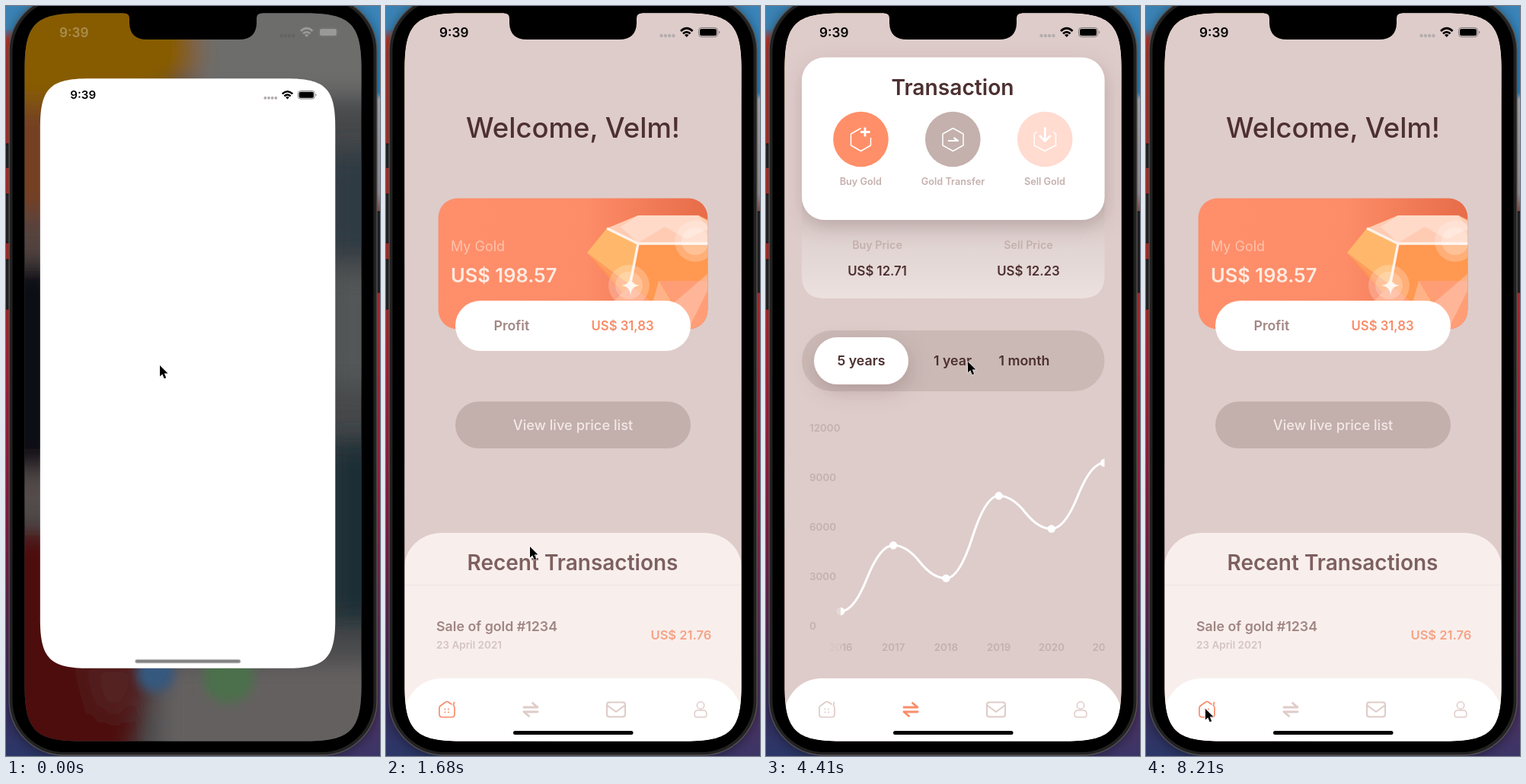
An HTML page that plays this animation: 491 by 985 pixels, repeating every 8.28 s.

```html
<!DOCTYPE html>
<html lang="en">
<head>
<meta charset="utf-8">
<title>Gold savings app</title>
<style>
html, body { margin: 0; width: 100%; height: 100%; overflow: hidden; background: #000; }
svg { display: block; width: 100%; height: 100%; }
text { font-family: Inter, "Open Sans", sans-serif; font-weight: 600; }
.mid { text-anchor: middle; }
.medium { font-weight: 500; }
.dark { fill: #4d3030; }
.muted { fill: #c4b0ad; }
.line { fill: none; stroke: currentColor; stroke-width: 1.7; stroke-linejoin: round; stroke-linecap: round; }
.off { color: #dfcbc8; }
.on { color: #f98d6a; }

/* Everything shares one 8280 ms clock. */
.anim { animation: 8280ms linear infinite; }
#sheet { animation-name: sheet; }
#status { animation-name: status; }
#indicator { animation-name: indicator; }
#pages { animation-name: appear; }
#home { animation-name: home; animation-timing-function: step-end; }
#trade { animation-name: trade; animation-timing-function: step-end; }
#veil { animation-name: veil; animation-timing-function: step-end; }
#cursor { animation-name: cursor; animation-timing-function: ease-in-out; }
.draw { stroke-dasharray: 1 1; animation-name: draw; }
.pop { animation-name: pop; }

@keyframes sheet {
  0% {
    d: path("M45 160C45 109 58 96 109 96H368C419 96 432 109 432 160V805C432 856 419 869 368 869H109C58 869 45 856 45 805Z");
    animation-timing-function: ease-out;
  }
  2.5%, 100% {
    d: path("M24.500 82C24.500 24 39 9.500 97 9.500H394C452 9.500 466.500 24 466.500 82V893C466.500 951 452 965.500 394 965.500H97C39 965.500 24.500 951 24.500 893Z");
  }
}
@keyframes status {
  0% { transform: translate(23.1px, 87.2px) scale(.877); animation-timing-function: ease-out; }
  2.5%, 100% { transform: none; }
}
@keyframes indicator {
  0% { transform: translate(23.1px, 22.7px) scale(.877); fill: #858585; animation-timing-function: ease-out; }
  2.5%, 100% { transform: none; fill: #000; }
}
@keyframes appear { 0%, 2.17% { opacity: 0; } 10.1%, 100% { opacity: 1; } }
@keyframes home { 0% { visibility: visible; } 26.2% { visibility: hidden; } 87.2%, 100% { visibility: visible; } }
@keyframes trade { 0% { visibility: hidden; } 26.2% { visibility: visible; } 87.2%, 100% { visibility: hidden; } }
@keyframes veil { 0% { opacity: 0; } 29.7%, 100% { opacity: .75; } }
@keyframes draw { 0%, 29.3% { stroke-dashoffset: 1; opacity: 0; } 29.7% { opacity: 1; } 34.7%, 100% { stroke-dashoffset: 0; opacity: 1; } }
@keyframes pop { 0%, 31.5% { opacity: 0; } 34.7%, 100% { opacity: 1; } }
@keyframes cursor {
  0%, 13.5% { transform: translate(202px, 472px); }
  17.8%, 20.3% { transform: translate(189px, 710px); }
  23.7%, 36.3% { transform: translate(188px, 923px); }
  41.4%, 43.1% { transform: translate(120px, 200px); }
  49%, 53.3% { transform: translate(265px, 467px); }
  60%, 63.4% { transform: translate(338px, 480px); }
  66.8%, 68.5% { transform: translate(350px, 600px); }
  77%, 81.1% { transform: translate(170px, 780px); }
  82.1%, 84.6% { transform: translate(150px, 815px); }
  85.5%, 100% { transform: translate(78px, 923px); }
}
</style>
</head>
<body>
<svg viewBox="0 0 491 985">
  <defs>
    <linearGradient id="leftEdge" x2="0" y2="1">
      <stop offset="0" stop-color="#3b83b5"/><stop offset=".03" stop-color="#3b83b5"/>
      <stop offset=".045" stop-color="#b5382e"/><stop offset=".4" stop-color="#b92d2b"/>
      <stop offset=".48" stop-color="#c0203a"/><stop offset=".7" stop-color="#8d1d48"/>
      <stop offset=".88" stop-color="#452b5d"/><stop offset="1" stop-color="#2b3768"/>
    </linearGradient>
    <linearGradient id="rightEdge" x2="0" y2="1">
      <stop offset="0" stop-color="#3b84b8"/><stop offset=".115" stop-color="#2587c9"/>
      <stop offset=".125" stop-color="#b9bac2"/><stop offset=".25" stop-color="#a7a0a5"/>
      <stop offset=".28" stop-color="#8b4638"/><stop offset=".4" stop-color="#c52f35"/>
      <stop offset=".65" stop-color="#ad2346"/><stop offset=".85" stop-color="#62305f"/>
      <stop offset="1" stop-color="#3c3567"/>
    </linearGradient>
    <linearGradient id="gold">
      <stop offset="0" stop-color="#ff8f6b"/><stop offset=".55" stop-color="#fd8c68"/><stop offset="1" stop-color="#e76c48"/>
    </linearGradient>
    <linearGradient id="priceFill" x2="0" y2="1">
      <stop offset="0" stop-color="#cdbbb8"/><stop offset=".45" stop-color="#dfd2d0"/><stop offset="1" stop-color="#ece1df"/>
    </linearGradient>
    <filter id="blur" x="-50%" y="-50%" width="200%" height="200%"><feGaussianBlur stdDeviation="16"/></filter>
    <filter id="soft" x="-50%" y="-50%" width="200%" height="200%"><feGaussianBlur stdDeviation="7"/></filter>
    <filter id="shadow" x="-40%" y="-40%" width="180%" height="200%">
      <feDropShadow dy="9" stdDeviation="13" flood-color="#6b4b48" flood-opacity=".27"/>
    </filter>
    <filter id="phoneShadow"><feDropShadow dx="0" dy="2" stdDeviation="8" flood-opacity=".4"/></filter>
    <path id="screenShape" d="M24.500 82C24.500 24 39 9.500 97 9.500H394C452 9.500 466.500 24 466.500 82V893C466.500 951 452 965.500 394 965.500H97C39 965.500 24.500 951 24.500 893Z"/>
    <clipPath id="screen"><use href="#screenShape"/></clipPath>
    <clipPath id="goldClip"><rect x="68.700" y="252.500" width="353.600" height="172" rx="25"/></clipPath>
    <clipPath id="chartClip"><rect x="47" y="530" width="397.500" height="340"/></clipPath>

    <g id="iconHome" class="line">
      <path d="M86 917l-4.500-3q-1.500-1-3 0l-7 5q-1.500 1-1.500 3v8q0 4 4 4h12q4 0 4-4v-8q0-2-1.500-3.500l1-4"/>
      <path d="M77.500 923.500v.1M82 923.500v.1M77.500 927.500v.1M82 927.500v.1" stroke-width="2"/>
    </g>
    <path id="iconSwap" class="line" style="stroke-width:2.900" d="M181 921H199L192.500 915.500M199 927H181L187.500 932.500"/>
    <g id="iconMail" class="line" style="stroke-width:2">
      <rect x="290" y="914.500" width="24" height="19" rx="3"/><path d="M291 919l11 8 11-8"/>
    </g>
    <g id="iconUser" class="line" style="stroke-width:1.500">
      <circle cx="413" cy="918.500" r="4.700"/><path d="M405 930q0-5 4.500-5h7q4.500 0 4.500 5 0 4-3 4h-10q-3 0-3-4z"/>
    </g>
    <g id="navBase">
      <path d="M24 985V933A49 50 0 0 1 73 883H418A49 50 0 0 1 467 933V985z" fill="#fff"/>
      <g class="off"><use href="#iconMail"/><use href="#iconUser"/></g>
    </g>
  </defs>

  <rect width="246" height="985" fill="url(#leftEdge)"/>
  <rect x="245" width="246" height="985" fill="url(#rightEdge)"/>
  <g fill="#252527" stroke="#111" stroke-width="1">
    <rect x="-4" y="181" width="10" height="31"/><rect x="-4" y="247" width="10" height="64"/>
    <rect x="-4" y="333" width="10" height="65"/><rect x="486" y="270" width="9" height="106"/>
  </g>
  <rect x="4.200" y="-13" width="482.800" height="997" rx="72" fill="#202022" stroke="#55524f" stroke-width="1.300" filter="url(#phoneShadow)"/>
  <rect x="8.500" y="-9" width="474" height="989" rx="68"/>

  <g clip-path="url(#screen)">
    <rect width="491" height="985" fill="#46484a"/>
    <g filter="url(#blur)">
      <rect x="240" y="-30" width="260" height="150" fill="#6d6d6c"/>
      <path d="M-30-30H240L255 80 150 150-30 250z" fill="#875b00"/>
      <rect x="-40" y="130" width="120" height="180" fill="#754021"/>
      <rect x="-40" y="270" width="120" height="60" fill="#54433e"/>
      <rect x="-40" y="340" width="120" height="270" fill="#070b12"/>
      <rect x="420" y="190" width="90" height="140" fill="#2f3a43"/>
      <rect x="420" y="350" width="90" height="150" fill="#535657"/>
      <rect x="420" y="570" width="90" height="240" fill="#1b2d34"/>
      <rect x="-40" y="610" width="120" height="60" fill="#554b4c"/>
      <rect x="200" y="860" width="300" height="140" fill="#656061"/>
      <path d="M-40 690H80L195 870 160 1000H-40z" fill="#4e080b"/>
      <path d="M100 860H185L165 930H120z" fill="#552024"/>
    </g>
    <g filter="url(#soft)"><circle cx="196" cy="876" r="25" fill="#34587f"/><circle cx="292" cy="882" r="34" fill="#4c704c"/></g>
    <use href="#statusArt" opacity=".3" style="filter:invert(1)"/>

    <path id="sheet" class="anim" fill="#fff"/>

    <g id="pages" class="anim">
      <rect width="491" height="985" fill="#deccca"/>

      <g id="home" class="anim">
        <text class="mid medium dark" x="245.500" y="173" font-size="36.500">Welcome, Velm!</text>
        <g clip-path="url(#goldClip)">
          <rect x="68" y="252" width="355" height="173" fill="url(#gold)"/>
          <path d="M264 324L290 292 331 275H410L430 284V400H332z" fill="#ff9850"/>
          <path d="M264 324L290 292 331 313 320 366 300 358z" fill="#ffb86b"/>
          <path d="M264 324L320 366 340 395z" fill="#ff9a61"/>
          <path d="M290 292L331 275H410L430 286V312H331z" fill="#ffcbb3"/>
          <path d="M331 275L308 290 331 311 366 290 395 306 424 292 410 275z" fill="#ffe2d5" opacity=".65"/>
          <path d="M320 366L347 387H300zM358 361H422V424H400z" fill="#ff9e76"/>
          <path d="M422 352V374L397 424 378 390zM358 361L376 390H350z" fill="#ffc9b4" opacity=".55"/>
          <path d="M290 292L331 312H424M331 312L320 368" fill="none" stroke="#fff2ea" stroke-width="3.500"/>
          <g fill="#fff" fill-opacity=".22">
            <circle cx="319" cy="367" r="27"/><circle cx="319" cy="367" r="18"/>
            <circle cx="406" cy="309" r="27"/><circle cx="406" cy="309" r="18"/>
          </g>
          <path d="M321 355Q322 366 333 367 322 368 321 380 320 368 309 367 320 366 321 355z" fill="#fff6ef"/>
        </g>
        <text x="85" y="322" font-size="18" fill="#ffc3ac" style="font-weight:400">My Gold</text>
        <text x="85" y="363" font-size="25.500" fill="#ffebe2">US$ 198.57</text>
        <rect x="91" y="387" width="309" height="66" rx="33" fill="#fff"/>
        <text x="141.500" y="426" font-size="17.700" fill="#a18683">Profit</text>
        <text x="269.500" y="426" font-size="16.700" fill="#f78d69">US$ 31,83</text>
        <rect x="91" y="519.500" width="309" height="61.500" rx="30.700" fill="#c3afac"/>
        <text class="mid medium" x="245.500" y="556.500" font-size="18.300" fill="#f2e8e6">View live price list</text>

        <path d="M24 985V738A49 46 0 0 1 73 692H418A49 46 0 0 1 467 738V985z" fill="#f8efed"/>
        <path d="M25 760.500H466" stroke="#ede2e1"/>
        <text class="mid" x="245" y="741" font-size="28" fill="#7d605f">Recent Transactions</text>
        <text x="66" y="821" font-size="17.800" fill="#a08582">Sale of gold #1234</text>
        <text x="66" y="843.500" font-size="13.500" fill="#d4c3c2">23 April 2021</text>
        <text x="347.500" y="832" font-size="16.500" fill="#f6a284">US$ 21.76</text>
        <use href="#navBase"/>
        <use href="#iconHome" class="on"/><use href="#iconSwap" class="off"/>
      </g>

      <g id="trade" class="anim">
        <path d="M47 240H444.500V354Q444.500 384 414 384H77Q47 384 47 354z" fill="url(#priceFill)"/>
        <rect x="47" y="67.500" width="397.500" height="213.500" rx="30" fill="#fff" filter="url(#shadow)"/>
        <text class="mid dark" x="245" y="117" font-size="28.200">Transaction</text>
        <circle cx="124.500" cy="175" r="36.300" fill="#ff8f68"/>
        <circle cx="245.300" cy="175" r="36.300" fill="#c4b0ac"/>
        <circle cx="366.200" cy="175" r="36.300" fill="#ffdbd0"/>
        <g fill="none" stroke="#fff" stroke-width="1.500" stroke-linejoin="round">
          <path class="anim draw" pathLength="1" d="M137.500 173V183L124.500 190.500 111.500 183V168L124.500 160.500"/>
          <path class="anim draw" pathLength="1" d="M245.500 160.500L259 168V183L245.500 190.500 232 183V168z"/>
          <path class="anim draw" pathLength="1" d="M356 165L352 168V183L366 190.500 380.500 183V168L376.500 165"/>
          <g class="anim pop" stroke-width="2.800">
            <path d="M130 159.500V171.500M124 165.500H136.500"/>
            <path d="M239 177H252L246.500 173" stroke-width="2.200"/>
            <path d="M366.300 159V177M359 170L366.300 177.500 373.600 170"/>
          </g>
        </g>
        <g class="mid muted" font-size="12.700">
          <text x="124.300" y="234.500">Buy Gold</text><text x="245.500" y="234.500">Gold Transfer</text><text x="366" y="234.500">Sell Gold</text>
        </g>
        <g class="mid muted" font-size="14.300"><text x="146" y="319">Buy Price</text><text x="344.500" y="319">Sell Price</text></g>
        <g class="mid dark" font-size="16.800"><text x="146" y="354">US$ 12.71</text><text x="344.500" y="354">US$ 12.23</text></g>

        <rect x="47" y="426" width="397.500" height="80" rx="40" fill="#cbb9b6"/>
        <rect x="63" y="435" width="124" height="62" rx="31" fill="#fff" filter="url(#shadow)"/>
        <g class="mid dark" font-size="17.800">
          <text x="125" y="472">5 years</text><text x="245" y="472">1 year</text><text x="339" y="472">1 month</text>
        </g>

        <g id="axis" class="muted" font-size="13.400"></g>
        <g clip-path="url(#chartClip)">
          <g id="years" class="mid muted" font-size="13.300"></g>
          <path id="curve" fill="none" stroke="#fff" stroke-width="3"/>
          <g id="dots" fill="#fff"></g>
        </g>
        <rect id="veil" class="anim" x="80" y="785" width="18" height="66" fill="#deccca"/>
        <use href="#navBase"/>
        <use href="#iconHome" class="off"/><use href="#iconSwap" class="on"/>
      </g>
    </g>

    <g id="status" class="anim">
      <g id="statusArt">
        <text x="70" y="41" font-size="17.200">9:39</text>
        <g fill="#b5aeae">
          <circle cx="361.500" cy="39" r="2.200"/><circle cx="366.800" cy="39" r="2.200"/>
          <circle cx="372.100" cy="39" r="2.200"/><circle cx="377.400" cy="39" r="2.200"/>
        </g>
        <g fill="none" stroke="#000" stroke-width="2.700">
          <path d="M387 33Q394.700 25.500 402.500 33M390 36.300Q394.700 31.800 399.500 36.300"/>
        </g>
        <path d="M392 38Q394.700 36 397.500 38L394.700 41z"/>
        <rect x="410.500" y="28.500" width="25" height="12" rx="3.700" fill="none" stroke="#777"/>
        <rect x="412" y="30" width="22" height="9" rx="2.300"/>
        <path d="M437 32.500Q439.500 34.500 437 36.500z" fill="#777"/>
      </g>
    </g>
    <rect id="indicator" class="anim" x="167" y="952" width="157.500" height="5" rx="2.500"/>
  </g>

  <path d="M155 8V9.500Q162 9.500 162 16V23Q163 44 185 44H306Q328 44 329 23V16Q329 9.500 336 9.500V8z"/>

  <g id="cursor" class="anim">
    <path d="M0 0V14.500L3.300 11.500 5.700 17.300 8.200 16.200 5.800 10.600H10.500z" stroke="#fff" stroke-width="1.200" stroke-linejoin="round" paint-order="stroke"/>
  </g>
</svg>
<script>
const byId = id => document.getElementById(id);
const label = (x, y, value) => `<text x="${x}" y="${y}">${value}</text>`;

const values = [900, 4900, 2900, 7900, 5900, 9900];
const points = values.map((value, i) => [98 + i * 69.2, 814.5 - value * 0.02167]);

// Each segment is two mirrored quadratics with level ends.
const curve = points.slice(1).reduce((path, [x, y], i) => {
  const [px, py] = points[i];
  return `${path} Q${px + (x - px) / 4} ${py} ${(px + x) / 2} ${(py + y) / 2} T${x} ${y}`;
}, `M${points[0]}`);

byId('curve').setAttribute('d', curve);
byId('dots').innerHTML = points.map(([x, y]) => `<circle cx="${x}" cy="${y}" r="5.2"/>`).join('');
byId('years').innerHTML = points.map(([x], i) => label(x, 846.5, 2016 + i)).join('');
byId('axis').innerHTML = [0, 1, 2, 3, 4].map(i => label(57, 819 - i * 65, i * 3000)).join('');
</script>
</body>
</html>
```
